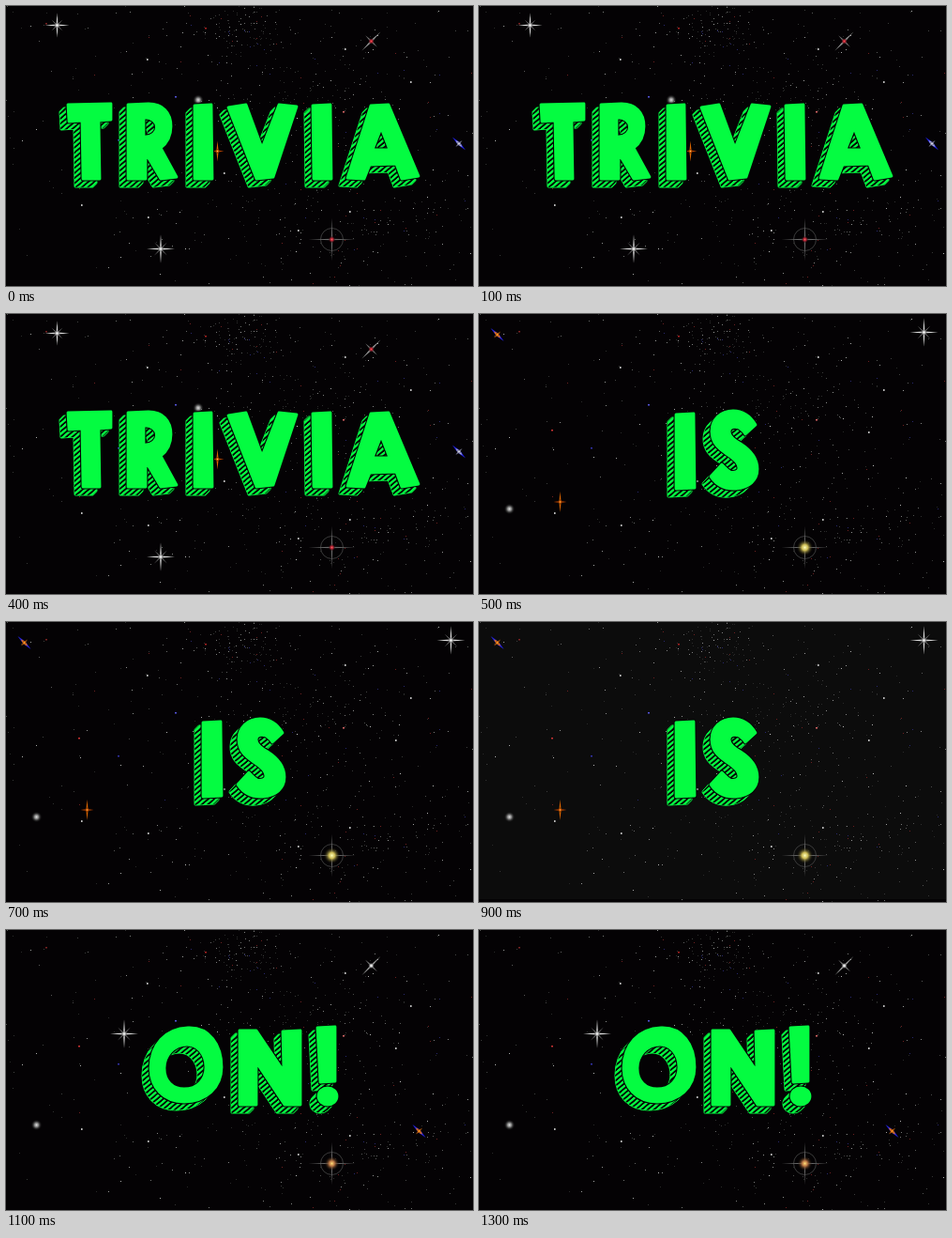
An HTML page with a canvas for the animation above (1500 ms loop, 498 by 298 pixels).

```html
<!DOCTYPE html>
<html lang="en">
<head>
<meta charset="utf-8">
<title>Trivia is on!</title>
<style>
html, body { margin: 0; width: 100%; height: 100%; overflow: hidden; background: #040204; }
canvas { display: block; }
</style>
</head>
<body>
<canvas id="stage" width="498" height="298" role="img" aria-label="TRIVIA IS ON!"></canvas>
<script>
const c = document.getElementById('stage').getContext('2d');
const GREEN = '#04fc41', NIGHT = '#040204', TAU = Math.PI * 2;

const words = [
  // TRIVIA
  `M66 105L112 104L112 121L99 122L100 184L82 184L81 122L67 123Z
   M130 105L152 104C167 104 176 113 176 128C176 139 172 146 165 151L182 182L165 184L149 157L149 184L130 184Z
   M147 119L147 139C165 140 165 118 147 119Z
   M201 106L219 105L220 184L201 184Z
   M237 108L256 105L273 151L291 105L310 107L285 182L267 184Z
   M327 106L346 105L347 184L328 184Z
   M389 106L408 105L440 181L422 184L416 168L388 169L382 184L364 183Z
   M400 130L391 153L409 153Z`,
  // IS
  `M210 107L229 106L230 185L210 186Z
   M295 118C289 108 282 103 271 103C258 103 248 112 248 125C248 137 255 143 264 149C272 154 277 159 277 164
   C277 168 272 169 268 168C264 166 262 163 259 160L247 173C253 182 262 187 274 186C288 185 297 177 297 165
   C297 153 290 145 279 138C272 134 267 129 267 125C267 120 273 120 277 121C280 123 283 125 284 128Z`,
  // ON!
  `M194 104C217 103 230 122 230 146C230 168 213 183 190 183C168 183 154 168 154 147C154 122 170 105 194 104Z
   M193 122C179 122 169 134 169 147C169 161 178 169 190 169C204 169 213 159 213 146C213 132 204 122 193 122Z
   M249 107L267 107L296 150L295 108L314 107L314 186L297 186L267 141L267 186L249 186Z
   M332 104L351 103L351 161L335 162Z
   M353 177A10 9 0 1 1 333 177A10 9 0 1 1 353 177Z`
].map(d => new Path2D(d));

// Diagonal hatching for the sides of the letters
const tile = document.createElement('canvas');
tile.width = tile.height = 8;
const t = tile.getContext('2d');
t.fillStyle = NIGHT;
t.fillRect(0, 0, 8, 8);
t.fillStyle = GREEN;
t.fillRect(0, 0, 8, 4.5);
const hatch = c.createPattern(tile, 'repeat');
hatch.setTransform(new DOMMatrix().rotate(-40).scale(0.52));

function shape(path, style, line) {
  c.fillStyle = c.strokeStyle = style;
  c.lineWidth = line;
  c.fill(path, 'evenodd');
  c.stroke(path);
}

function extrude(path, style, line) {
  for (let k = 4; k <= 8; k++) {
    c.save();
    c.translate(-k, k);
    shape(path, style, line);
    c.restore();
  }
}

function lettering(path) {
  c.lineJoin = 'round';
  extrude(path, GREEN, 3);
  extrude(path, hatch, 1.6);
  shape(path, NIGHT, 5);
  shape(path, GREEN, 2.8);
}

// Background dots
let seed = 71;
const rnd = () => (seed = seed * 16807 % 2147483647) / 2147483647;
const bell = () => rnd() + rnd() + rnd() - 1.5;
const clusters = [[249, 22, 50, 34, 130], [275, 150, 130, 150, 190], [390, 235, 130, 80, 170], [330, 85, 110, 50, 100]];
const dots = [];
function addDot(x, y, max) {
  const v = 40 + max * rnd() ** 3, hue = rnd();
  const color = hue < .04 ? '#6c2020' : hue < .07 ? '#28286c' : `rgb(${v},${v},${v})`;
  dots.push([Math.round(x), Math.round(y), color]);
}
for (let i = 0; i < 260; i++) addDot(rnd() * 498, rnd() * 296, 160);
for (const [x, y, w, h, n] of clusters)
  for (let i = 0; i < n; i++) addDot(x + bell() * w, y + bell() * h, 120);

const bright = [[361, 45], [431, 80], [366, 218], [311, 238], [415, 125], [80, 211], [150, 56], [232, 177], [151, 224]];
const tinted = [[77, 123, '#c33'], [359, 112, '#d66'], [180, 96, '#55d'], [212, 23, '#a22'], [42, 18, '#722'], [119, 142, '#33a']];

function sky(gray) {
  c.fillStyle = NIGHT;
  c.fillRect(0, 0, 498, 298);
  if (gray) {
    c.fillStyle = '#0c0c0c';
    c.fillRect(0, 0, 498, 295);
  }
  for (const [x, y, color] of dots) {
    c.fillStyle = color;
    c.fillRect(x, y, 1, 1);
  }
  c.fillStyle = '#bbb';
  for (const [x, y] of bright) c.fillRect(x, y, 1.6, 2);
  for (const [x, y, color] of tinted) {
    c.fillStyle = color;
    c.fillRect(x, y, 2, 1.5);
  }
}

function glow(x, y, r, color, core = color) {
  const g = c.createRadialGradient(x, y, 0, x, y, r);
  g.addColorStop(0, core);
  g.addColorStop(.35, color);
  g.addColorStop(1, 'transparent');
  c.fillStyle = g;
  c.fillRect(x - r, y - r, 2 * r, 2 * r);
}

// Tapered streak through a point
function ray(x, y, len, deg, color, w = 1) {
  c.save();
  c.translate(x, y);
  c.rotate(deg * TAU / 360);
  c.fillStyle = color;
  c.beginPath();
  c.moveTo(-len, 0);
  c.lineTo(0, -w);
  c.lineTo(len, 0);
  c.lineTo(0, w);
  c.fill();
  c.restore();
}

function cross(x, y, len) {
  ray(x, y, len, 0, '#ddd');
  ray(x, y, len, 90, '#ddd');
  ray(x, y, len * .65, 45, '#777', .7);
  ray(x, y, len * .65, 135, '#777', .7);
  glow(x, y, 3.5, '#ccc', '#fff');
}

function spark(x, y, color, core) {
  ray(x, y, 14, -45, '#999', 1);
  ray(x, y, 9, 45, '#777', 1);
  glow(x, y, 3.5, color, core);
}

function comet(x, y, color, core) {
  ray(x, y, 10, 45, '#22d', 1.6);
  ray(x, y, 5, 45, color, 1.8);
  ray(x, y, 5, -45, color, .8);
  glow(x, y, 2.5, color, core);
}

function target(color, core, r) {
  const x = 347.5, y = 248.5;
  c.strokeStyle = '#3a3a3a';
  c.lineWidth = 1;
  c.beginPath();
  c.arc(x, y, 12, 0, TAU);
  c.stroke();
  ray(x, y, 25, 0, '#666', .8);
  ray(x, y, 23, 90, '#666', .8);
  glow(x, y, r, color, core);
}

function ember(x, y) {
  ray(x, y, 7, 0, '#b40', .9);
  ray(x, y, 11, 90, '#d60', 1.1);
  glow(x, y, 3, '#c50', '#fc6');
}

const pearl = (x, y) => glow(x, y, 6, '#888', '#ddd');

const scenes = [
  () => {
    cross(54.5, 20.5, 13);
    cross(165, 258.5, 15);
    pearl(205, 100);
    ember(225.5, 154.5);
    spark(389.5, 37.5, '#b23', '#e55');
    comet(483, 146.5, '#aac', '#fff');
    target('#b23', '#e66', 4);
  },
  () => {
    comet(19.5, 22, '#e71', '#fc5');
    cross(474.5, 19.5, 15);
    pearl(32.5, 207.5);
    ember(86.5, 200);
    target('#cb5', '#ffb', 9);
  },
  () => {
    spark(389.5, 38, '#ccc', '#fff');
    cross(126, 110.5, 15);
    pearl(32.5, 207.5);
    comet(440.5, 214, '#e71', '#fc5');
    target('#b74', '#fd7', 8);
  }
];

function draw(now) {
  const time = now % 1500, i = Math.floor(time / 500);
  sky(time >= 900 && time < 1000);
  scenes[i]();
  lettering(words[i]);
  requestAnimationFrame(draw);
}
draw(0);
</script>
</body>
</html>
```
